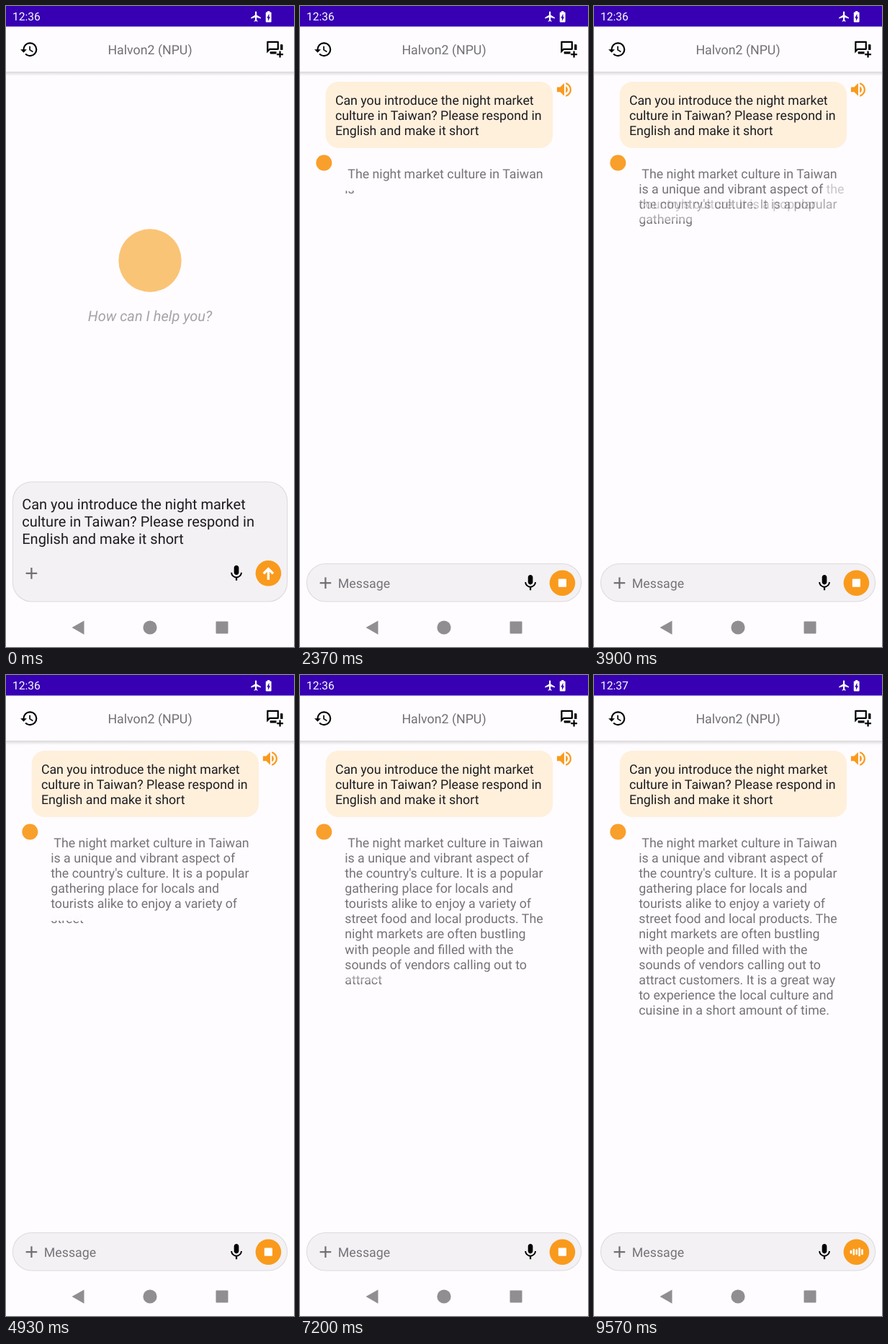
Recreate the animation shown at these times as an HTML page with a canvas. Size 400x889 px, loop 9.83 s.

```html
<!DOCTYPE html>
<html lang="en">
<head>
<meta charset="utf-8">
<title>Chat assistant</title>
<style>
html, body { margin: 0; width: 100%; height: 100%; overflow: hidden; background: #fefcff; }
canvas { display: block; width: 400px; height: 889px; }
</style>
</head>
<body>
<canvas id="stage"></canvas>
<script>
const W = 400, H = 889, LOOP = 9830;
const DP = 400 / 360;
const BG = '#fefcff', INK = '#1d1b20', GREY = '#757378', ORANGE = '#f99a1c';
const BODY = 16 * DP, LINE = 19 * DP, REPLY_WIDTH = 287.5;
const SENT = 1465, FIRST_TOKEN = 1817, TOKEN_GAP = 91.5, FADE = 125, DONE = 9225, MINUTE = 9560;

const question = ['Can you introduce the night market', 'culture in Taiwan? Please respond in', 'English and make it short'];
const bubbleLines = question;
const reply = " The night market culture in Taiwan is a unique and vibrant aspect of the country's culture. " +
  'It is a popular gathering place for locals and tourists alike to enjoy a variety of street food and local products. ' +
  'The night markets are often bustling with people and filled with the sounds of vendors calling out to attract customers. ' +
  'It is a great way to experience the local culture and cuisine in a short amount of time.';
const tokens = reply.match(/ ?\w+|'s|\./g);

const icons = {
  history: 'M13 3a9 9 0 0 0-9 9H1l3.89 3.89.07.14L9 12H6c0-3.87 3.13-7 7-7s7 3.13 7 7-3.13 7-7 7c-1.93 0-3.68-.79-4.94-2.06l-1.42 1.42A8.954 8.954 0 0 0 13 21a9 9 0 0 0 0-18zm-1 5v5l4.28 2.54.72-1.21-3.5-2.08V8H12z',
  newChat: 'M15 4v7H5.17L4 12.17V4h11m1-2H3c-.55 0-1 .45-1 1v14l4-4h10c.55 0 1-.45 1-1V3c0-.55-.45-1-1-1zM19 6h2c.55 0 1 .45 1 1v6h-3zM6 15h8v3H7c-.55 0-1-.45-1-1zM17.5 14.5h2v3h3v2h-3v3h-2v-3h-3v-2h3z',
  mic: 'M12 14c1.66 0 2.99-1.34 2.99-3L15 5c0-1.66-1.34-3-3-3S9 3.34 9 5v6c0 1.66 1.34 3 3 3zm5.3-3c0 3-2.54 5.1-5.3 5.1S6.7 14 6.7 11H5c0 3.41 2.72 6.23 6 6.72V21h2v-3.28c3.28-.48 6-3.3 6-6.72h-1.7z',
  speaker: 'M3 9v6h4l5 5V4L7 9H3zm13.5 3c0-1.77-1.02-3.29-2.5-4.03v8.05c1.48-.73 2.5-2.25 2.5-4.02zM14 3.23v2.06c2.89.86 5 3.54 5 6.71s-2.11 5.85-5 6.71v2.06c4.01-.91 7-4.49 7-8.77s-2.99-7.86-7-8.77z',
  plane: 'M21 16v-2l-8-5V3.5c0-.83-.67-1.5-1.5-1.5S10 2.67 10 3.5V9l-8 5v2l8-2.5V19l-2 1.5V22l3.5-1 3.5 1v-1.5L13 19v-5.5l8 2.5z',
  battery: 'M15.67 4H14V2h-4v2H8.33C7.6 4 7 4.6 7 5.33v15.33C7 21.4 7.6 22 8.33 22h7.33c.74 0 1.34-.6 1.34-1.33V5.33C17 4.6 16.4 4 15.67 4zM11 20v-5.5H9L13 7v5.5h2L11 20z'
};
for (const name in icons) icons[name] = new Path2D(icons[name]);

const ratio = window.devicePixelRatio || 1;
function setUp(canvas) {
  canvas.width = Math.round(W * ratio);
  canvas.height = Math.round(H * ratio);
  const c = canvas.getContext('2d');
  c.scale(ratio, ratio);
  c.textRendering = 'geometricPrecision';
  return c;
}
const ctx = setUp(document.getElementById('stage'));
const layer = setUp(document.createElement('canvas'));

function text(c, str, x, y, size, color, style = '') {
  c.font = `${style} ${size}px Roboto, sans-serif`;
  c.fillStyle = color;
  c.fillText(str, x, y);
}

function icon(name, x, y, color, scale = DP) {
  ctx.save();
  ctx.translate(x, y);
  ctx.scale(scale, scale);
  ctx.fillStyle = color;
  ctx.fill(icons[name]);
  ctx.restore();
}

function box(x, y, w, h, r, color) {
  ctx.beginPath();
  ctx.roundRect(x, y, w, h, r);
  ctx.fillStyle = color;
  ctx.fill();
}

function disc(x, y, r, color) {
  ctx.beginPath();
  ctx.arc(x, y, r, 0, 2 * Math.PI);
  ctx.fillStyle = color;
  ctx.fill();
}

// Breaks lines so that the squared slack of all but the last is smallest.
function wrap(str) {
  const words = str.trim().split(' ');
  words[0] = ' ' + words[0];
  const n = words.length, cost = [0], from = [0];
  ctx.font = `${BODY}px Roboto, sans-serif`;
  for (let end = 1; end <= n; end++) {
    cost[end] = Infinity;
    for (let start = end - 1; start >= 0; start--) {
      const slack = REPLY_WIDTH - ctx.measureText(words.slice(start, end).join(' ')).width;
      if (slack < 0 && start < end - 1) break;
      const total = cost[start] + (end === n ? 0 : slack * slack);
      if (total < cost[end]) { cost[end] = total; from[end] = start; }
    }
  }
  const lines = [];
  for (let end = n; end > 0; end = from[end]) lines.unshift(words.slice(from[end], end).join(' '));
  return lines;
}

const wrapped = [];
const replyLines = i => wrapped[i] || (wrapped[i] = wrap(tokens.slice(0, i + 1).join('')));

function drawReply(c, lines) {
  lines.forEach((line, i) => text(c, line, 56 * DP, 238.8 + i * LINE, BODY, GREY));
}

function drawBars(t) {
  ctx.fillStyle = BG;
  ctx.fillRect(0, 0, W, H);
  const shade = ctx.createLinearGradient(0, 91, 0, 97);
  shade.addColorStop(0, '#d9d7da');
  shade.addColorStop(1, BG);
  ctx.fillStyle = shade;
  ctx.fillRect(0, 91, W, 6);

  ctx.fillStyle = '#3700b3';
  ctx.fillRect(0, 0, W, 28.5);
  text(ctx, t < MINUTE ? '12:36' : '12:37', 8.9, 20, 14 * DP, '#fff');
  icon('plane', 338.8, 6, '#fff', 0.72);
  icon('battery', 355.3, 5.4, '#fff', 0.78);

  icon('history', 18.9, 46.9, '#000');
  ctx.textAlign = 'center';
  text(ctx, 'Halvon2 (NPU)', 200, 67, BODY, '#727074');
  ctx.textAlign = 'left';
  icon('newChat', 360, 46.5, '#000');

  ctx.fillStyle = '#908e91';
  ctx.beginPath();
  ctx.moveTo(91.5, 862);
  ctx.lineTo(108.5, 852.5);
  ctx.lineTo(108.5, 871.8);
  ctx.fill();
  disc(200, 862, 9.6, '#908e91');
  box(291.5, 853.6, 17, 17, 1, '#908e91');
}

function drawWelcome() {
  disc(200, 353, 43.7, '#fac476');
  ctx.textAlign = 'center';
  text(ctx, 'How can I help you?', 200, 436.8, 18 * DP, '#a5a3a7', 'italic');
  ctx.textAlign = 'left';
}

function drawInput(t) {
  const sent = t >= SENT;
  const top = sent ? 773.5 : 660, mid = sent ? 800.2 : 786.8;
  box(9.4, top, 381.2, 826 - top, 26.5, '#f3f1f4');
  ctx.strokeStyle = '#dddbde';
  ctx.lineWidth = 1.1;
  ctx.stroke();

  if (sent) text(ctx, 'Message', 52.8, 806.6, BODY, '#757378');
  else question.forEach((line, i) => text(ctx, line, 20 * DP, 698.4 + i * 23.7, 18 * DP, INK));
  if (t >= 495 && t < 995) {
    ctx.fillStyle = '#6200ee';
    ctx.fillRect(246, 727.2, 2.2, 23.7);
  }

  ctx.fillStyle = '#6f6d71';
  ctx.fillRect(27.6, mid - 1.1, 15.6, 2.2);
  ctx.fillRect(34.3, mid - 7.8, 2.2, 15.6);
  icon('mic', 306.7, mid - 13.3, '#000');
  disc(364.4, mid, 17.8, ORANGE);
  if (!sent) drawArrow(364.4, mid);
  else if (t < DONE) box(358.8, mid - 5.6, 11.2, 11.2, 1, '#fff');
  else [5, 9, 8, 12, 8].forEach((h, i) => box(355.6 + i * 3.9, mid - h / 2, 2.6, h, 1.3, '#fff'));
}

function drawArrow(x, y) {
  ctx.strokeStyle = '#fff';
  ctx.lineWidth = 3.4;
  ctx.beginPath();
  ctx.moveTo(x - 6.6, y + 0.4);
  ctx.lineTo(x, y - 6.2);
  ctx.lineTo(x + 6.6, y + 0.4);
  ctx.moveTo(x, y - 5.5);
  ctx.lineTo(x, y + 9);
  ctx.stroke();
}

function drawQuestion(t) {
  ctx.globalAlpha = Math.min(1, (t - SENT) / 130);
  box(35.6, 105, 315.5, 92, 17.8, '#fff0dc');
  bubbleLines.forEach((line, i) => text(ctx, line, 44 * DP, 136.8 + i * LINE, BODY, INK));
  icon('speaker', 353.6, 102.6, ORANGE);
  ctx.globalAlpha = 1;
}

// The previous text sits on an opaque card that fades off the new text.
function drawAnswer(t) {
  const k = Math.min(tokens.length - 1, Math.floor((t - FIRST_TOKEN) / TOKEN_GAP));
  const age = t - FIRST_TOKEN - k * TOKEN_GAP;
  disc(33.3, 217.5, 11, '#f99f2b');
  drawReply(ctx, replyLines(k));
  if (k === 0 || age >= FADE) return;

  const old = replyLines(k - 1);
  layer.clearRect(0, 0, W, H);
  layer.fillStyle = BG;
  layer.fillRect(50, 205, 340, 51.3 + (old.length - 1) * LINE);
  drawReply(layer, old);
  ctx.globalAlpha = 0.5 + 0.5 * Math.cos(Math.PI * age / FADE);
  ctx.drawImage(layer.canvas, 0, 0, W, H);
  ctx.globalAlpha = 1;
}

function draw() {
  // The screen advances at thirty pictures a second.
  const t = Math.floor((performance.now() % LOOP) * 0.03 + 0.15) / 0.03 + 1;
  drawBars(t);
  if (t < SENT) drawWelcome();
  else drawQuestion(t);
  if (t >= FIRST_TOKEN) drawAnswer(t);
  drawInput(t);
  requestAnimationFrame(draw);
}
draw();
</script>
</body>
</html>
```
